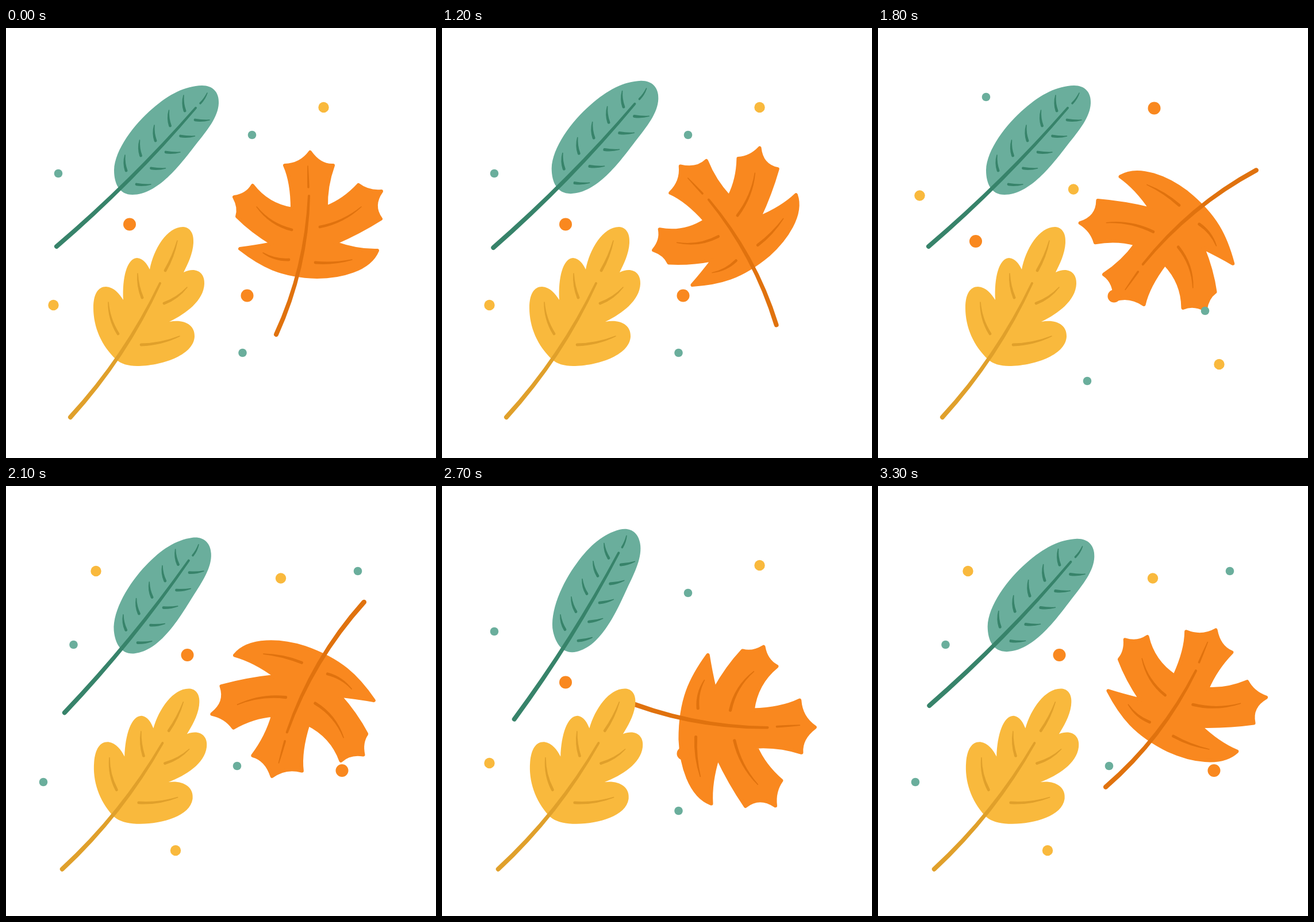
An HTML page with a canvas that plays this animation: 748 px wide and 748 px high, repeating every 3600 ms.

```html
<!DOCTYPE html>
<html lang="en">
<head>
<meta charset="utf-8">
<title>Autumn leaves</title>
<style>
  html, body { margin: 0; width: 100%; height: 100%; overflow: hidden; background: #fff; }
  canvas { display: block; width: 748px; height: 748px; }
</style>
</head>
<body>
<canvas id="stage" width="748" height="748"></canvas>
<script>
const ctx = document.getElementById('stage').getContext('2d');
const STEP = 300, STEPS = 12;

// Stems, tips and veins are strokes: start x,y, end x,y, sideways bow as a share of the length.
const teal = {
  pivot: [219, 247], fill: '#6aae9c', line: '#37836a',
  blade: `M341 100 C360 100 371 112 370 131 C369 155 350 178 330 203
    C303 238 264 290 220 290 C197 290 188 271 188 247
    C189 212 223 167 255 140 C284 115 311 101 341 100Z`,
  stem: [88, 380, 330, 139, 0.038], tip: [350, 113, 338, 131, -0.1], veins: []
};
for (let i = 0; i < 5; i++) {
  const leftX = 207 + 25.5 * i, leftY = 221 - 26 * i;
  const rightX = 252 + 25.5 * i, rightY = 272 - 28 * i;
  teal.veins.push([leftX, leftY, leftX + 2, leftY + 27, 0.13], [rightX, rightY, rightX - 25, rightY, -0.08]);
}

const yellow = {
  pivot: [210, 512], fill: '#f9b93d', line: '#e0a02b',
  blade: `M192 577 C166 553 152 520 152 487 C152 463 160 450 174 450
    C188 451 197 462 204 473 C202 435 210 401 228 400 C239 401 245 410 250 420
    C257 384 280 346 308 346 C321 347 327 358 326 374 C325 393 316 411 309 425
    C329 415 346 424 345 445 C344 474 313 497 284 511 C308 506 329 515 328 537
    C326 570 269 588 228 588 C212 588 200 584 192 577Z`,
  stem: [112, 677, 268, 444, 0.076],
  veins: [
    [298, 370, 277, 422, -0.07], [229, 427, 237, 469, 0.1], [315, 451, 275, 479, -0.13],
    [302, 536, 235, 551, -0.1], [178, 477, 195, 532, 0.135]
  ]
};

const orange = {
  pivot: [526, 340], fill: '#f9881f', line: '#e0720e', round: 6,
  blade: `M407 384 Q432 381 463 375 Q428 354 402 328 Q407 312 397 294
    Q419 291 429 274 Q455 308 498 315 Q498 268 485 239 Q513 238 529 216
    Q546 240 569 239 Q556 275 557 312 Q588 300 613 273 Q630 286 653 284
    Q635 309 652 332 Q614 356 572 374 Q612 388 646 387
    C632 421 581 433 541 433 C478 431 444 413 407 384Z`,
  stem: [470, 533, 527, 292, 0.1], tip: [525, 240, 526, 277, 0],
  veins: [
    [436, 311, 497, 351, 0.175], [618, 311, 546, 346, -0.135],
    [447, 391, 492, 403, 0.16], [602, 403, 538, 408, -0.08]
  ]
};

// Poses: pivot x, pivot y, rotation in degrees, scale.
const tealPoses = {
  rest: [219, 247, 0, 1], stretch: [222.5, 244, -0.6, 1.027],
  lean: [218.5, 248.5, -5.9, 1], rise: [223.5, 246.5, -13, 1]
};
const tealOrder = 'rest lean rest lean stretch rise rest lean stretch rise rest stretch'.split(' ');
const yellowPoses = [[210, 512, 0, 1], [209, 510, 4.7, 1]];

// Key points of the orange tumble: step, pivot x, pivot y, rotation.
const tumble = [
  [2, 526, 340, 0], [4, 495, 335, -41.7], [6, 491.5, 372, -143],
  [7, 505, 380, -162.7], [9, 514.5, 421, -272], [11, 531.5, 366, -335.5]
];

// The leaf rocks twice, then tumbles round while coming a little closer.
function orangePose(step) {
  const at = step < 4 ? 2 + step % 2 : step;
  const next = tumble.findIndex(key => key[0] >= at);
  const to = tumble[next], from = tumble[Math.max(0, next - 1)];
  const share = (at - from[0]) / (to[0] - from[0] || 1);
  const [x, y, angle] = [1, 2, 3].map(i => from[i] + (to[i] - from[i]) * share);
  const closeness = Math.sin(Math.PI * Math.max(0, at - 4) / 9) ** 2;
  return [x, y, angle, 1 + 0.083 * closeness];
}

// Confetti: x, y pairs by colour.
const radii = new Map([[teal, 7.3], [yellow, 9.2], [orange, 11]]);
const confetti = {
  a: [[428, 186, 91, 253, 411.5, 565], [552.5, 138, 82.5, 482], [215, 341.5, 419.5, 465.5]],
  b: [[188, 120, 569, 492, 364, 614], [72.5, 291.5, 340, 280.5, 593.5, 585],
      [480.5, 139.5, 170, 371, 410.5, 466.5]],
  c: [[612, 148, 117.5, 276, 402, 487, 65, 515], [156.5, 148, 478, 160.5, 295, 634],
      [315.5, 294, 584.5, 495]],
  ring: [[], [], []]
};
for (let i = 0; i < 8; i++) {
  const angle = 0.2 + i * Math.PI / 4;
  confetti.ring[i % 3].push(366 + 280 * Math.cos(angle), 375 + 260 * Math.sin(angle));
}
const confettiOrder = 'a ring b c a ring b c ring a b c'.split(' ');

// A bowed stroke with round ends whose width changes along its length.
function drawStroke([x0, y0, x1, y1, bow], startWidth, endWidth) {
  const dx = x1 - x0, dy = y1 - y0, length = Math.hypot(dx, dy);
  const cx = (x0 + x1) / 2 - dy * bow, cy = (y0 + y1) / 2 + dx * bow;
  const startAngle = Math.atan2(cy - y0, cx - x0), endAngle = Math.atan2(y1 - cy, x1 - cx);
  const r0 = startWidth / 2, r1 = endWidth / 2, quarter = Math.PI / 2;
  const middle = 0.45 * Math.max(startWidth, endWidth) / length;
  const nx = -dy * middle, ny = dx * middle;
  ctx.beginPath();
  ctx.arc(x0, y0, r0, startAngle + quarter, startAngle - quarter);
  ctx.quadraticCurveTo(cx - nx, cy - ny, x1 + Math.sin(endAngle) * r1, y1 - Math.cos(endAngle) * r1);
  ctx.arc(x1, y1, r1, endAngle - quarter, endAngle + quarter);
  ctx.quadraticCurveTo(cx + nx, cy + ny, x0 - Math.sin(startAngle) * r0, y0 + Math.cos(startAngle) * r0);
  ctx.fill();
}

function drawLeaf(leaf, [x, y, degrees, scale]) {
  const blade = new Path2D(leaf.blade);
  ctx.save();
  ctx.translate(x, y);
  ctx.rotate(degrees * Math.PI / 180);
  ctx.scale(scale, scale);
  ctx.translate(-leaf.pivot[0], -leaf.pivot[1]);
  ctx.fillStyle = ctx.strokeStyle = leaf.fill;
  ctx.fill(blade);
  if (leaf.round) {
    ctx.lineWidth = leaf.round;
    ctx.lineJoin = 'round';
    ctx.stroke(blade);
  }
  ctx.fillStyle = leaf.line;
  drawStroke(leaf.stem, 8, 4);
  if (leaf.tip) drawStroke(leaf.tip, 1.5, 3.5);
  leaf.veins.forEach(vein => drawStroke(vein, 1.5, 4.8));
  ctx.restore();
}

function drawConfetti(set) {
  [teal, yellow, orange].forEach((leaf, index) => {
    const points = set[index];
    ctx.fillStyle = leaf.fill;
    for (let i = 0; i < points.length; i += 2) {
      ctx.beginPath();
      ctx.arc(points[i], points[i + 1], radii.get(leaf), 0, 2 * Math.PI);
      ctx.fill();
    }
  });
}

const start = performance.now();
function draw() {
  const step = Math.floor((performance.now() - start) / STEP) % STEPS;
  ctx.fillStyle = '#fff';
  ctx.fillRect(0, 0, 748, 748);
  drawLeaf(orange, orangePose(step));
  drawLeaf(teal, tealPoses[tealOrder[step]]);
  drawLeaf(yellow, yellowPoses[step % 2]);
  drawConfetti(confetti[confettiOrder[step]]);
  requestAnimationFrame(draw);
}
draw();
</script>
</body>
</html>
```
